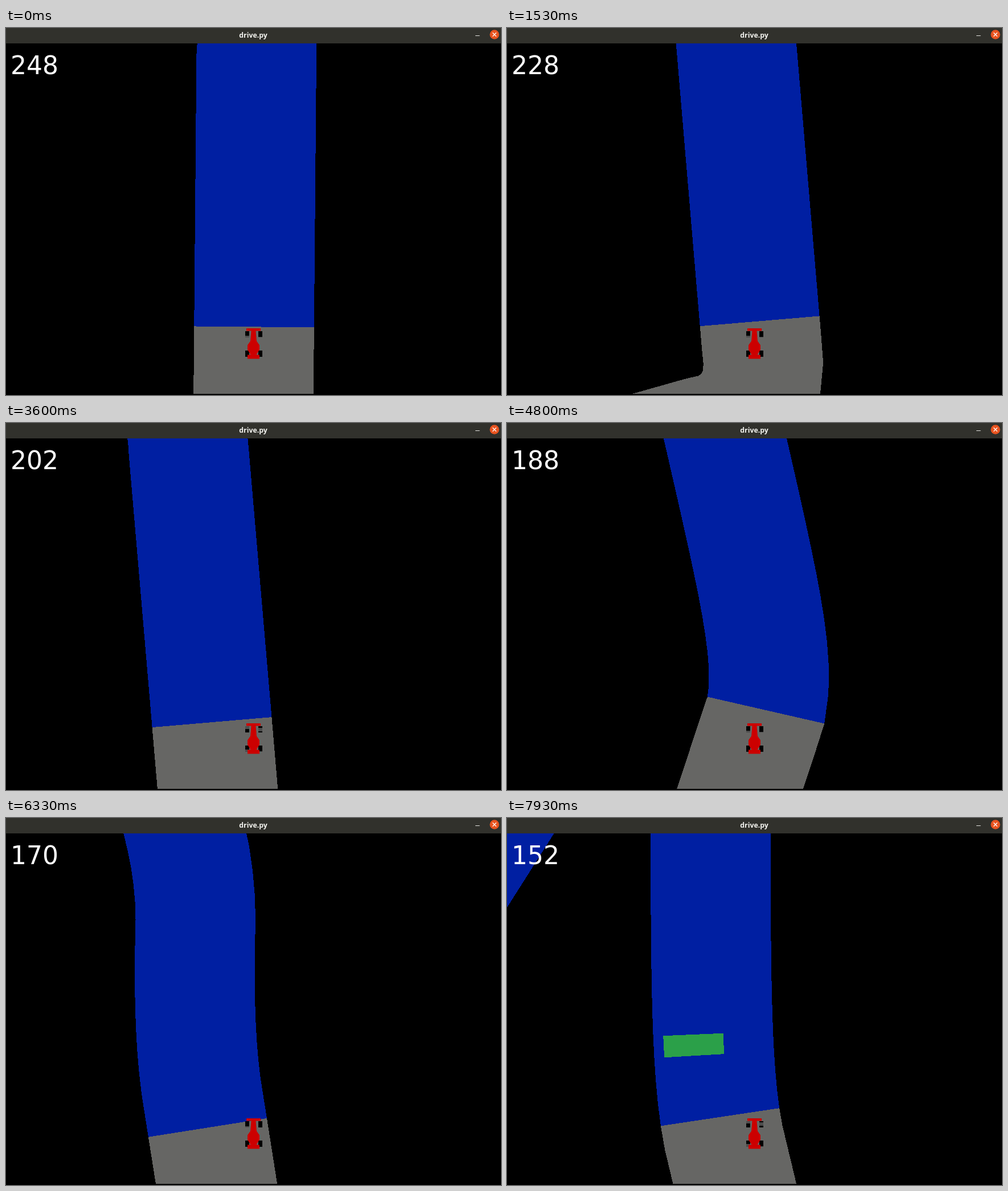
Recreate the animation shown at these times as an HTML page. Size 869 by 644 pixels, loop 8 s.

```html
<!DOCTYPE html>
<html lang="en">
<head>
<meta charset="utf-8">
<title>drive.py</title>
<style>
  html, body { margin: 0; width: 100%; height: 100%; overflow: hidden; background: #000; }
  svg { display: block; width: 869px; height: 644px; }
</style>
</head>
<body>
<svg viewBox="0 0 869 644">
  <rect width="869" height="644"/>
  <g id="world" shape-rendering="crispEdges">
    <polygon id="far" fill="#001fa2"/>
    <polygon id="ahead" fill="#001fa2"/>
    <polygon id="driven" fill="#666664"/>
    <g id="blocks" fill="#2ba049"/>
  </g>
  <g id="wheels" shape-rendering="crispEdges"></g>
  <path fill="#cc0000" d="M422 527h25v4.500h-8.500l1.500 18 5 7v8l-5 8v1h5v7h-21v-7h5v-1l-5-8v-8l5-7 1.500-18h-8.500z"/>
  <rect y="642" width="869" height="2"/>
  <rect width="869" height="27" fill="#31312c"/>
  <text x="434" y="17" text-anchor="middle" font-family="'Open Sans', 'Noto Sans', sans-serif" font-weight="700" font-size="12.300" fill="#f2f2ee">drive.py</text>
  <path d="M824 13.500h7.500" stroke="#e4e4e0"/>
  <circle cx="857.500" cy="11.500" r="8.200" fill="#e95420"/>
  <path d="M854.300 8.300l6.400 6.400m0-6.400l-6.400 6.400" stroke="#fff" stroke-width="1.300"/>
  <text id="left" x="8" y="81" font-family="'DejaVu Sans', sans-serif" font-size="44" fill="#fff"></text>
</svg>
<script>
const $ = id => document.getElementById(id);
const RAD = Math.PI / 180;
const TILE = 36.7, HALF = 105.3;      // tile length and half road width
const FIRST = -8, LAST = 122;         // tile range
const CAR = { x: 434.5, y: 531 };     // front axle on screen
const TICK = 200 / 3, TICKS = 120;

// Angles are degrees, counter-clockwise from straight up.
const move = (p, deg, along, right = 0) => {
  const s = Math.sin(deg * RAD), c = Math.cos(deg * RAD);
  return { x: p.x - s * along + c * right, y: p.y - c * along - s * right };
};
const points = list => list.map(p => p.x.toFixed(2) + ',' + p.y.toFixed(2)).join(' ');

// From its first tile on, a bend eases the road towards a new heading.
const bends = [
  { from: FIRST, to: 0, ease: 1 },
  { from: 14, to: 79.1, ease: 1 },
  { from: 60, to: 110.4, ease: 0.34 },
  { from: 80, to: 97.4, ease: 0.18 },
  { from: 88, to: 114.9, ease: 1, limit: 3.2 },
  { from: 95, to: 101.4, ease: 0.27 }
];
function steer(dir, tile) {
  const { to, ease, limit = 17.4 } = bends.filter(b => b.from <= tile).pop();
  return dir + Math.max(-limit, Math.min(limit, ease * (to - dir)));
}

const nodes = {};
let pos = { x: 0, y: -FIRST * TILE }, dir = 0;
for (let i = FIRST; i <= LAST; i++) {
  const before = dir;
  dir = steer(dir, i);
  nodes[i] = { ...pos, dir, mid: (before + dir) / 2 };
  pos = move(pos, dir, TILE);
}

function strip(from, to, l = -HALF, r = HALF) {
  const a = [], b = [];
  for (let i = from; i <= to; i++) {
    a.push(move(nodes[i], nodes[i].mid, 0, l));
    b.unshift(move(nodes[i], nodes[i].mid, 0, r));
  }
  return points(a.concat(b));
}

// Driving line: tick, tile position, offset from the road centre, heading
const keys = [
  [0, -0.18, -1, 0.5],
  [15, 12.51, -4, 0.3],
  [21.6, 18.45, -14, 74.3],
  [34, 28.36, 17, 74.3],
  [54, 45.67, 72.2, 74.2],
  [72, 59.13, -10.6, 97.3],
  [95, 77.99, 81.5, 101.4],
  [119, 95.55, 58.5, 101.4]
].map(([tick, s, off, deg]) => {
  const n = nodes[Math.floor(s)];
  return { tick, s, deg, ...move(n, n.dir, (s - Math.floor(s)) * TILE, off) };
});

// Cubic path through the keys; the view follows its tangent.
function pose(tick) {
  let i = 0;
  while (i < keys.length - 2 && tick >= keys[i + 1].tick) i++;
  const a = keys[i], b = keys[i + 1];
  const u = (tick - a.tick) / (b.tick - a.tick), v = 1 - u;
  const pull = Math.hypot(b.x - a.x, b.y - a.y) / Math.cos((b.deg - a.deg) / 3 * RAD) / 3;
  const c = move(a, a.deg, pull), d = move(b, b.deg, -pull);
  const at = k => v * v * v * a[k] + 3 * v * v * u * c[k] + 3 * v * u * u * d[k] + u * u * u * b[k];
  const slope = k => v * v * (c[k] - a[k]) + 2 * u * v * (d[k] - c[k]) + u * u * (b[k] - d[k]);
  return {
    x: at('x'), y: at('y'),
    deg: Math.atan2(-slope('x'), -slope('y')) / RAD,
    s: a.s + (b.s - a.s) * u
  };
}

function add(parent, tag, attrs) {
  const el = document.createElementNS('http://www.w3.org/2000/svg', tag);
  for (const k in attrs) el.setAttribute(k, attrs[k]);
  return parent.appendChild(el);
}

// An obstacle covers one tile and half the road width.
function block(tile, off) {
  add($('blocks'), 'polygon', { points: strip(tile, tile + 1, off - HALF / 2, off + HALF / 2) });
}
block(37, -10);
block(99, -35);

// A later stretch of road passes the top left corner at the end of the run.
const end = pose(TICKS - 1);
const edge = move(end, end.deg, CAR.y - 28, 82 - CAR.x);
const slant = end.deg - 32.4;
$('far').setAttribute('points', points(
  [[250, 0], [-300, 0], [-300, -2 * HALF], [250, -2 * HALF]]
    .map(([along, right]) => move(edge, slant, along, right))));

const R = 5.5;
const wheels = [];
for (const y of [537, 571.5])
  for (const x of [420, 443]) {
    add($('wheels'), 'rect', { x, y: y - R, width: 6.5, height: 2 * R });
    const el = add($('wheels'), 'rect', { x, width: 6.5, fill: '#4d4d4d' });
    wheels.push({ y, shift: 0.3 + wheels.length * 0.8, el });
  }

// Lighter patch on a rolling tyre, seen from above
function roll({ y, shift, el }, dist) {
  const a = dist / R + shift, b = a + 1.2;
  const side = q => Math.sin(q) > 0 ? Math.sign(Math.cos(q)) : Math.cos(q);
  const hidden = Math.sin(a) > 0 && Math.sin(b) > 0;
  const p = R * side(a), q = R * side(b);
  el.setAttribute('y', y + Math.min(p, q));
  el.setAttribute('height', hidden ? 0 : Math.abs(p - q));
}

function draw(ms) {
  const tick = Math.min(TICKS - 1, Math.floor((ms + 5) / TICK));
  const p = pose(tick);
  const tile = Math.ceil(p.s);
  $('world').setAttribute('transform',
    `translate(${CAR.x} ${CAR.y}) rotate(${p.deg}) translate(${-p.x} ${-p.y})`);
  $('driven').setAttribute('points', strip(FIRST, tile));
  $('ahead').setAttribute('points', strip(tile, LAST));
  $('left').textContent = 248 - tile;
  wheels.forEach(w => roll(w, p.s * TILE));
}

const begin = performance.now();
function loop() {
  draw((performance.now() - begin) % 8000);
  requestAnimationFrame(loop);
}
loop();
</script>
</body>
</html>
```
